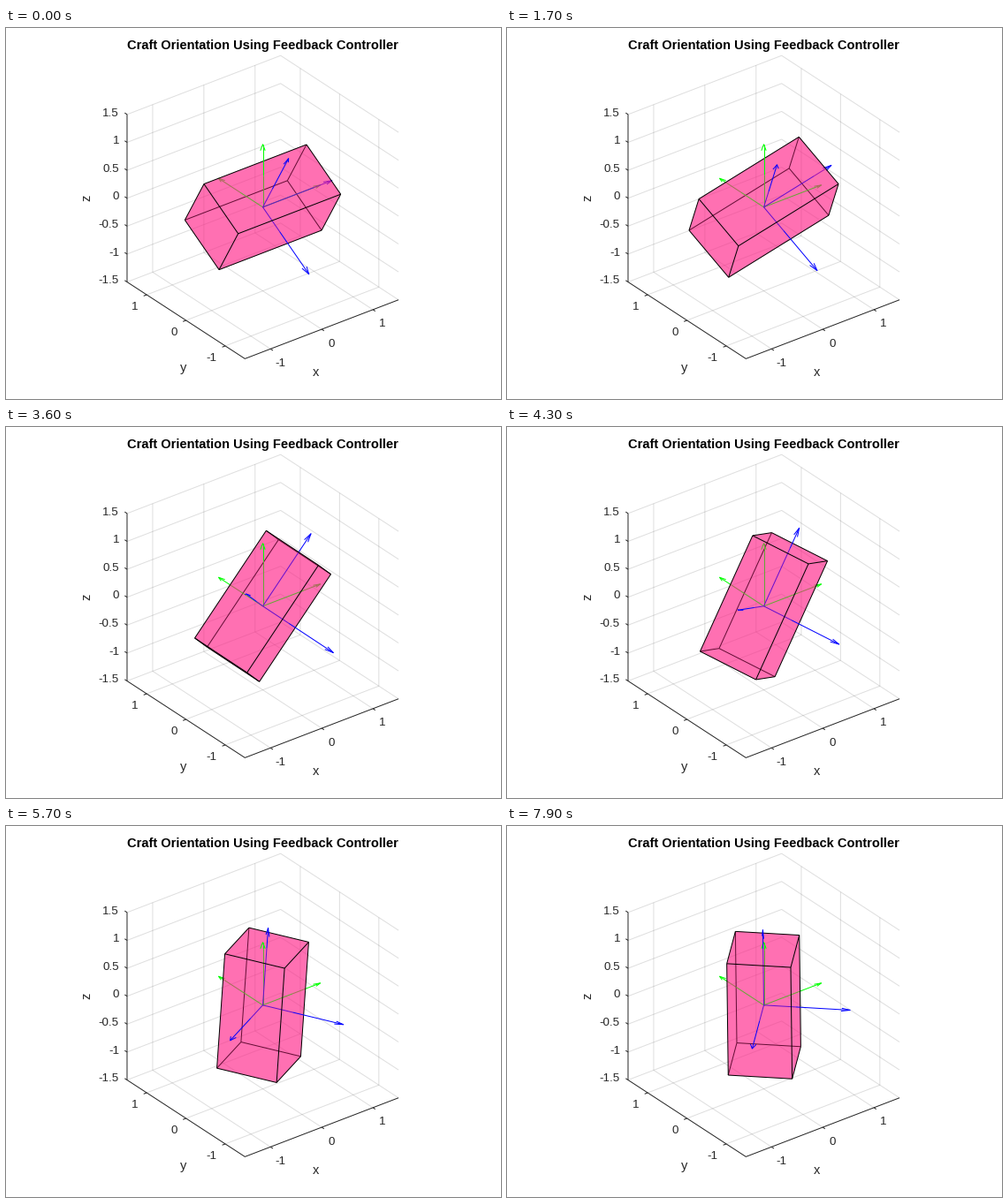
A matplotlib script that plays this animation: 560 by 420 pixels, repeating every 8000 ms.

```python
import itertools
import numpy as np
import matplotlib.pyplot as plt
from matplotlib.animation import FuncAnimation
from matplotlib.collections import LineCollection, PolyCollection

plt.rcParams["font.family"] = "Liberation Sans"

W, H, DPI = 560, 420, 100
PX = 72 / DPI                       # points per pixel
UNIT = 73.0                         # pixels per axis unit
CENTRE = np.array([290.0, 202.3])
INK = (0.15, 0.15, 0.15)
PINK = (1.0, 0.13, 0.53)
BLUE, GREEN = (0, 0, 1), (0, 1, 0)
LIM = 1.5

# Camera: rows are screen right, screen up, toward the viewer
az, el = np.radians([-37.5, 30])
VIEW = np.array([
    [np.cos(az), np.sin(az), 0],
    [-np.sin(az) * np.sin(el), np.cos(az) * np.sin(el), np.cos(el)],
    [np.sin(az) * np.cos(el), -np.cos(az) * np.cos(el), np.sin(el)],
])
UP = VIEW[:, 2]


def to_px(p):
    """View-space points to pixel positions."""
    p = np.asarray(p, float)
    return CENTRE + UNIT * p[..., :2] * [1, -1]


def world(*p):
    return to_px(VIEW @ np.array(p, float))


fig = plt.figure(figsize=(W / DPI, H / DPI), dpi=DPI, facecolor="white")
ax = fig.add_axes([0, 0, 1, 1])
ax.set_xlim(-0.5, W - 0.5)
ax.set_ylim(H - 0.5, -0.5)
ax.axis("off")


def lines(z, color, segs=()):
    col = LineCollection(list(segs), colors=[color], linewidths=PX, zorder=z)
    ax.add_collection(col)
    return col


def label(x, y, s, size=13.33, **kw):
    kw.setdefault("color", INK)
    ax.text(x, y, s, fontsize=size * PX, **kw)


def draw_axes():
    grid, ticks = [], []
    for v in (-1, 0, 1):
        grid += [[world(v, -LIM, -LIM), world(v, LIM, -LIM), world(v, LIM, LIM)],
                 [world(-LIM, v, -LIM), world(LIM, v, -LIM), world(LIM, v, LIM)]]
        p = world(v, -LIM, -LIM)
        ticks.append([p, world(v, -LIM - 0.06, -LIM)])
        label(p[0] + 11, p[1] + 19.5, f"{v}", ha="center")
        p = world(-LIM, v, -LIM)
        ticks.append([p, world(-LIM - 0.06, v, -LIM)])
        label(p[0] - 10, p[1] + 17, f"{v}", ha="right")
    for v in np.arange(-1.5, 1.6, 0.5):
        grid.append([world(-LIM, LIM, v), world(LIM, LIM, v), world(LIM, -LIM, v)])
        p = world(-LIM, LIM, v)
        ticks.append([p, world(-LIM, LIM + 0.06, v)])
        label(p[0] - 9, p[1] + 1.8, f"{v:g}", ha="right")
    lines(1, (*INK, 0.15), grid)
    frame = [world(LIM, -LIM, -LIM), world(-LIM, -LIM, -LIM),
             world(-LIM, LIM, -LIM), world(-LIM, LIM, LIM)]
    lines(2, INK, ticks + [frame])
    label(350, 393.5, "x", 14.67, ha="center")
    label(200, 389, "y", 14.67, ha="center")
    label(91, 192, "z", 14.67, ha="center", va="center", rotation=90)
    label(289.5, 24, "Craft Orientation Using Feedback Controller", 14.67,
          ha="center", weight="bold", color="black")


draw_axes()

# Craft attitude: time step, long axis and side axis in view space (pixels)
KEYS = np.array([
    [4, 58.0, 22.3, -38.3, 38.0, -56.5, 26.3],
    [17, 56.6, 35.1, -29.9, 44.8, -53.2, 22.2],
    [28, 49.6, 51.3, -15.4, 53.4, -46.4, 18.0],
    [43, 29.7, 65.5, 12.3, 63.1, -32.0, 18.0],
    [57, 4.5, 64.7, 33.5, 67.4, -16.3, 22.3],
    [69, -1.4, 63.4, 36.1, 70.6, -8.5, 17.4],
    [79, -0.8, 63.1, 36.7, 72.3, -4.2, 8.8],
])
TIMES, POSES = KEYS[:, 0], KEYS[:, 1:]
SLOPES = np.gradient(POSES, TIMES, axis=0, edge_order=2)
HALF = np.array([0.5, 0.5, 1.0])    # side, depth, long


def unit(v):
    return v / np.linalg.norm(v)


def attitude(t):
    """Rows: side, depth and long axis of the craft in view space."""
    t = max(t, TIMES[0])
    i = min(np.searchsorted(TIMES, t, side="right") - 1, len(TIMES) - 2)
    h = TIMES[i + 1] - TIMES[i]
    s = (t - TIMES[i]) / h
    pose = ((1 + 2 * s) * (1 - s) ** 2 * POSES[i]
            + s * (1 - s) ** 2 * h * SLOPES[i]
            + s * s * (3 - 2 * s) * POSES[i + 1]
            + s * s * (s - 1) * h * SLOPES[i + 1])
    long = unit(pose[:3])
    side = unit(pose[3:] - long * (pose[3:] @ long))
    return np.array([side, np.cross(side, long), long])


def box_parts(body):
    """Faces and edges, split into [back, front]."""
    faces, edges = ([], []), ([], [])
    seen = {(k, s): s * body[k, 2] > 0 for k in range(3) for s in (-1, 1)}
    for k in range(3):
        i, j = [n for n in range(3) if n != k]
        for s in (-1, 1):
            quad = []
            for si, sj in ((-1, -1), (1, -1), (1, 1), (-1, 1)):
                c = np.zeros(3)
                c[[k, i, j]] = s, si, sj
                quad.append(to_px((c * HALF) @ body))
            faces[seen[k, s]].append(quad)
        for si, sj in itertools.product((-1, 1), repeat=2):
            ends = []
            for s in (-1, 1):
                c = np.zeros(3)
                c[[k, i, j]] = s, si, sj
                ends.append(to_px((c * HALF) @ body))
            edges[seen[i, si] or seen[j, sj]].append(ends)
    return faces, edges


def arrow_parts(body, d, size):
    """Arrow pieces as [behind, inside, in front] of the craft."""
    parts = ([], [], [])
    comp = body @ d
    reach = HALF / np.maximum(np.abs(comp), 1e-9)
    k = int(np.argmin(reach))
    cut = min(reach[k], size)
    parts[1].append(to_px([0 * d, cut * d]))
    layer = 1
    if cut < size:
        layer = 2 if comp[k] * body[k, 2] > 0 else 0
        parts[layer].append(to_px([cut * d, size * d]))
    side = np.cross(d, UP)
    n = np.linalg.norm(side)
    side = side / n if n > 1e-6 else np.array([1.0, 0, 0])
    tip, back = size * d, 0.9 * size * d
    wing = 0.033 * size * side
    parts[layer].append(to_px([back + wing, tip, back - wing]))
    return parts


def faces_layer(z):
    col = PolyCollection([], facecolors=[(*PINK, 0.4)], edgecolors="none",
                         linewidths=0, zorder=z)
    ax.add_collection(col)
    return col


face_cols = [faces_layer(4), faces_layer(7)]
edge_cols = [lines(5, "black"), lines(8, "black")]
green_cols = [lines(z, GREEN) for z in (3, 6, 9)]
blue_cols = [lines(z + 0.1, BLUE) for z in (3, 6, 9)]


def set_arrows(cols, body, axes, size):
    parts = [arrow_parts(body, d, size) for d in axes]
    for n, col in enumerate(cols):
        col.set_segments([seg for p in parts for seg in p[n]])


def update(i):
    body = attitude(i)
    faces, edges = box_parts(body)
    for n in (0, 1):
        face_cols[n].set_verts(faces[n])
        edge_cols[n].set_segments(edges[n])
    set_arrows(green_cols, body, VIEW.T, 1.125)
    set_arrows(blue_cols, body, body, 1.35)
    return face_cols + edge_cols + green_cols + blue_cols


anim = FuncAnimation(fig, update, frames=80, interval=100, repeat=True,
                     repeat_delay=0, init_func=lambda: update(0), blit=False)
plt.show()
```
